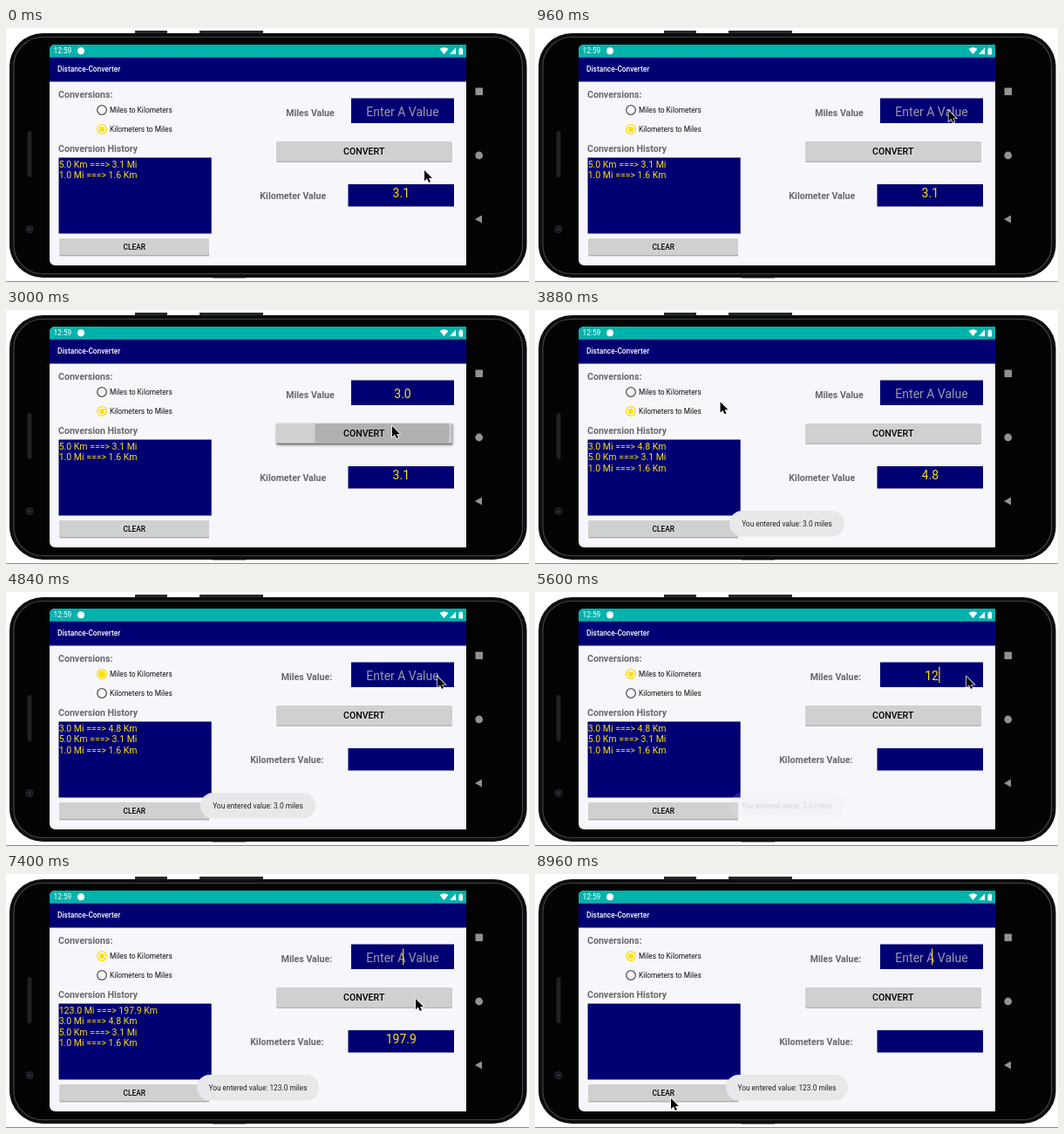
These frames come from a looping animation (600x291 px, 9000 ms). An HTML page:

```html
<!DOCTYPE html>
<html lang="en">
<head>
<meta charset="utf-8">
<title>Distance converter</title>
<style>
html, body { margin: 0; width: 100%; height: 100%; overflow: hidden; background: #fff; }
svg { display: block; width: 600px; height: 291px; }
text { font: 8.35px Roboto, Arial, sans-serif; white-space: pre; }
.mid { text-anchor: middle; }
.label { font-size: 10.6px; font-weight: 700; fill: #68676a; }
.medium { font-weight: 500; }
.big { font-size: 14px; }
.list { font-size: 10.5px; }
.yellow { fill: #fde000; }
.navy { fill: #000073; }
.button { fill: #cfd1d0; }
.shadow { filter: blur(.7px); opacity: .35; }
.lift { filter: blur(1.5px); }
</style>
</head>
<body>
<svg viewBox="0 0 600 291">
  <defs>
    <clipPath id="convertClip"><rect x="310" y="130" width="201.500" height="22.700" rx="1.500"/></clipPath>
    <clipPath id="clearClip"><rect x="61" y="241" width="172" height="19.300" rx="1.500"/></clipPath>
  </defs>

  <!-- phone -->
  <path d="M0 290.500H600" stroke="#888"/>
  <path d="M148 3h37v4h-37zM222 3h73v4h-73zM237 283h38v3.500h-38z" fill="#26292b"/>
  <rect x="4" y="6" width="593.500" height="280" rx="38" fill="#0c0d0e"/>
  <rect x="9" y="10.500" width="583.500" height="271" rx="33" fill="#030304" stroke="#3f4345" stroke-width="1.200"/>
  <rect x="24.500" y="118" width="5" height="53" rx="2.500" fill="#202122"/>
  <circle cx="27" cy="230.500" r="4" fill="#15171c" stroke="#292c32"/>
  <circle cx="27" cy="230.500" r="1.500" fill="#2a3347"/>
  <g fill="#929292">
    <rect x="538.500" y="68.500" width="8.500" height="8.500" rx=".7"/>
    <circle cx="542.700" cy="146" r="4.400"/>
    <path d="M538 219l8-4.600v9.200z"/>
  </g>

  <!-- screen -->
  <path d="M57 19H528V272H57q-7 0-7-7V26q0-7 7-7z" fill="#f7f6fa"/>
  <path d="M50 33.500V26q0-7 7-7H528V33.500z" fill="#00b3ab"/>
  <path d="M50 33.500H528V61.500H50z" class="navy"/>
  <g fill="#fff">
    <text x="54.500" y="29.300">12:59</text>
    <circle cx="86" cy="26.300" r="4"/>
    <path d="M497.500 24q5-3.500 10 0l-5 6zM509 30h7v-7.500zM519.500 23.500h1.300v-1h2v1h1.300v7h-4.600z"/>
    <text x="59" y="50.300" class="medium">Distance-Converter</text>
  </g>
  <text class="label" x="60" y="80.300">Conversions:</text>
  <text class="label" x="60" y="141.500">Conversion History</text>
  <text class="label mid" id="milesLabel" y="100.500"></text>
  <text class="label mid" id="kmLabel" y="196.300"></text>
  <g fill="none" stroke-width="1.300">
    <circle id="ring0" cx="110" cy="94" r="5.300"/>
    <circle id="ring1" cx="110" cy="116" r="5.300"/>
  </g>
  <circle id="dot0" cx="110" cy="94" class="yellow"/>
  <circle id="dot1" cx="110" cy="116" class="yellow"/>
  <g fill="#111">
    <text x="119" y="97">Miles to Kilometers</text>
    <text x="119" y="119">Kilometers to Miles</text>
  </g>

  <path class="navy" d="M396 80.500H514V109H396zM392.500 179H514V204.500H392.500zM60.500 148.500H235.700V235.500H60.500z"/>
  <text id="input" class="big mid" x="455" y="100.500"></text>
  <path id="caret" stroke="#fde000" stroke-width="1.200"/>
  <text id="result" class="big mid yellow" x="453.300" y="194.300"></text>
  <g id="history" class="yellow"></g>

  <rect class="shadow" x="310.500" y="131" width="201" height="22.700"/>
  <rect class="shadow" x="61.500" y="242" width="171.500" height="19.300"/>
  <rect class="lift" id="convertShade" x="310.500" y="131" width="202" height="24"/>
  <rect class="lift" id="clearShade" x="61.500" y="242" width="172" height="20.500"/>
  <rect class="button" x="310" y="130" width="201.500" height="22.700" rx="1.500"/>
  <rect class="button" x="61" y="241" width="172" height="19.300" rx="1.500"/>
  <g clip-path="url(#convertClip)"><circle id="convertRipple" fill="#b0b1b1"/></g>
  <g clip-path="url(#clearClip)"><circle id="clearRipple" fill="#b0b1b1"/></g>
  <text class="medium mid" x="410.700" y="145.300" style="font-size:10.6px">CONVERT</text>
  <text class="medium mid" x="147.300" y="253.500">CLEAR</text>

  <g id="toast">
    <rect id="pill" y="230" height="29.500" rx="14.750" fill="#e8e7ea"/>
    <text id="toastText" class="mid" x="289" y="247.500" fill="#222"></text>
  </g>
  <path id="pointer" d="M0 0V12.300L2.900 9.600L5 14L7 13.100L5 8.900H8.900z" stroke="#fff" stroke-width="1.400" paint-order="stroke"/>
</svg>
<script>
const LOOP = 9000;
const CONVERT1 = 3080, SWITCH = 4520, CONVERT2 = 7000, CLEAR = 8500;
const $ = id => document.getElementById(id);
const clamp = v => Math.max(0, Math.min(1, v));
const ramp = (t, a, b) => clamp((t - a) / (b - a));
const smooth = p => p * p * (3 - 2 * p);
const set = (id, attrs) => { for (const k in attrs) $(id).setAttribute(k, attrs[k]); };

// pointer stops: time, x, y
const path = [
  [0, 480, 163], [300, 480, 163], [850, 474.5, 94.5], [2350, 474.5, 94.5], [2800, 443, 133],
  [3250, 443, 133], [4250, 110, 93], [4560, 110, 93], [4820, 495, 97], [5900, 495, 97],
  [6480, 475, 131], [6850, 470, 143], [7450, 470, 143], [8150, 156, 257], [LOOP, 156, 257]
];
// input edits: time, content (each restarts the caret blink)
const edits = [
  [1000, ""], [1750, "3"], [1980, "3."], [2200, "3.0"], [CONVERT1, ""],
  [5300, "1"], [5550, "12"], [5800, "123"], [CONVERT2, ""], [CLEAR, ""]
];
const results = [[0, "3.1"], [CONVERT1, "4.8"], [SWITCH, ""], [CONVERT2, "197.9"], [CLEAR, ""]];
const entries = ["1.0 Mi ===> 1.6 Km", "5.0 Km ===> 3.1 Mi", "3.0 Mi ===> 4.8 Km", "123.0 Mi ===> 197.9 Km"];
const latest = (list, t) => list.filter(e => e[0] <= t).pop();

const rows = entries.map((_, i) => {
  const row = document.createElementNS("http://www.w3.org/2000/svg", "text");
  row.setAttribute("class", "list");
  row.setAttribute("x", 60.7);
  row.setAttribute("y", 159.7 + i * 12.45);
  $("history").append(row);
  return row;
});

function pointerAt(t) {
  const i = Math.max(1, path.findIndex(p => p[0] > t));
  const [a, b] = [path[i - 1], path[i]];
  const p = smooth(ramp(t, a[0], b[0]));
  return [a[1] + (b[1] - a[1]) * p, a[2] + (b[2] - a[2]) * p];
}

// grows from the pressed point towards the button's middle, then fades
function ripple(name, t, start, from, mid, size) {
  const age = t - start;
  const p = ramp(age, 0, 260);
  const alpha = age < 0 ? 0 : 1 - ramp(age, 260, 480);
  set(name + "Ripple", {
    cx: from[0] + (mid[0] - from[0]) * p * .62,
    cy: from[1] + (mid[1] - from[1]) * p,
    r: size * p, opacity: alpha
  });
  set(name + "Shade", { opacity: alpha * .45 * ramp(age, 0, 100) });
}

function radio(i, on) {
  set("ring" + i, { stroke: on > 0 ? "#fde000" : "#555" });
  set("dot" + i, { r: 3.1 * on });
}

function draw(t) {
  const switched = t >= SWITCH;
  $("milesLabel").textContent = switched ? "Miles Value:" : "Miles Value";
  $("kmLabel").textContent = switched ? "Kilometers Value:" : "Kilometer Value";
  set("milesLabel", { x: switched ? 345 : 349 });
  set("kmLabel", { x: switched ? 322.3 : 329.3 });
  const pop = switched ? ramp(t, SWITCH, SWITCH + 120) : 0;
  radio(0, pop * (1 + .3 * (1 - ramp(t, 4800, 4950))));
  radio(1, switched ? 0 : 1);

  const edit = latest(edits, t);
  const typed = edit ? edit[1] : "";
  $("input").textContent = typed || "Enter A Value";
  set("input", { fill: typed ? "#fde000" : "#9a9aa4" });
  const caretX = typed ? 456 + $("input").getComputedTextLength() / 2 : 455.7;
  set("caret", {
    d: `M${caretX} 85.500V104`,
    opacity: edit && (t - edit[0]) % 1000 < 500 ? 1 : 0
  });
  $("result").textContent = latest(results, t)[1];

  const count = t >= CLEAR ? 0 : 2 + (t >= CONVERT1) + (t >= CONVERT2);
  rows.forEach((row, i) => row.textContent = i < count ? entries[count - 1 - i] : "");

  const second = t >= 5000;
  ripple("convert", t, second ? 6800 : 2850, second ? [471, 145] : [443, 138], [411, 141.5], 133);
  ripple("clear", t, 8380, [156, 254], [147, 251], 110);

  const shown = (second && t >= CONVERT2 ? CONVERT2 : CONVERT1) + 60;
  const miles = t >= CONVERT2 ? "123.0" : "3.0";
  const width = t >= CONVERT2 ? 140 : 132;
  $("toastText").textContent = `You entered value: ${miles} miles`;
  set("pill", { x: 289 - width / 2, width });
  set("toast", { opacity: ramp(t, shown, shown + 200) * (1 - ramp(t, shown + 2250, shown + 2500)) });

  set("pointer", { transform: `translate(${pointerAt(t)})` });
}

const begin = performance.now();
function tick() {
  draw((performance.now() - begin) % LOOP);
  requestAnimationFrame(tick);
}
tick();
</script>
</body>
</html>
```
